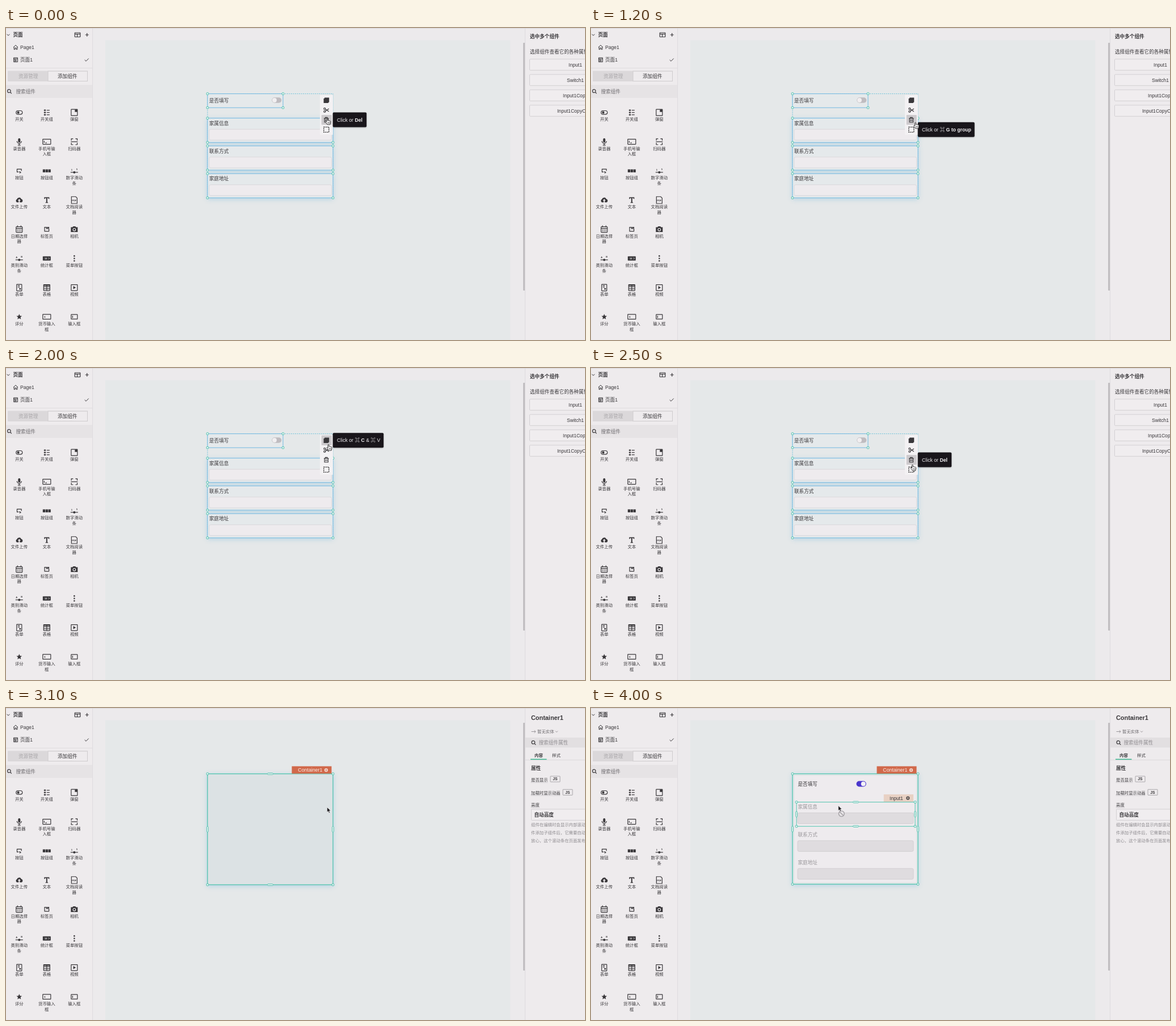
Animation of 1020 by 549 pixels, one loop 4100 ms. Source, as an HTML page:

```html
<!DOCTYPE html>
<html lang="zh-CN">
<head>
<meta charset="utf-8">
<title>组件编辑器</title>
<style>
  html, body { margin: 0; width: 100%; height: 100%; overflow: hidden; background: #eeebed; }
  svg { display: block; width: 1020px; height: 549px; }
  text { font-family: "Liberation Sans", "Noto Sans CJK SC", "Noto Sans CJK", "DejaVu Sans", sans-serif; white-space: pre; }
  .icon { fill: none; stroke: #39373a; stroke-width: 1.2; }
  .icon .solid, .solid { fill: #39373a; stroke: none; }
  .glow { filter: drop-shadow(0 2px 4px #b4d3e3); }
  .tip { filter: drop-shadow(0 1px 1px #0003); }
</style>
</head>
<body>
<svg id="stage" viewBox="0 0 1020 549"></svg>
<script>
const INK = '#39373a', GRAY = '#8f8c90', BLUE = '#72b9e2', TEAL = '#50c4ae';

const rect = (x, y, w, h, fill, stroke = 'none', r = 0, extra = '') =>
  `<rect x="${x}" y="${y}" width="${w}" height="${h}" rx="${r}" fill="${fill}" stroke="${stroke}" ${extra}/>`;
const text = (x, cy, str, { size = 8.6, fill = INK, bold = false, anchor = 'start' } = {}) =>
  `<text x="${x}" y="${cy + size * 0.36}" font-size="${size}" fill="${fill}" text-anchor="${anchor}"${bold ? ' font-weight="700"' : ''}>${str}</text>`;
const path = (d, extra = '') => `<path d="${d}" ${extra}/>`;
const solid = d => path(d, 'class="solid"');
const icon = (x, y, body) => `<g class="icon" transform="translate(${x} ${y})">${body}</g>`;
const group = (id, body) => `<g id="${id}">${body}</g>`;
const tiny = (x, y, str, fill = INK) =>
  `<g stroke="none">${text(x, y, str, { size: 4, fill, bold: true, anchor: 'middle' })}</g>`;
const frame = (w, h, r = 0.5) => rect(-w / 2, -h / 2, w, h, 'none', INK, r);
const magnifier = (x, y) => icon(x, y, '<circle cx="-.6" cy="-.6" r="2.8"/>' + path('M1.5 1.5L3.8 3.8'));
const gear = (x, y, color) =>
  `<g fill="none" stroke="${color}"><circle cx="${x}" cy="${y}" r="2.4" stroke-width="1.3"/><circle cx="${x}" cy="${y}" r=".5"/></g>`;

function handles(x, y, w, h, mids = false) {
  let out = '';
  for (const px of [x, x + w]) for (const py of [y, y + h])
    out += rect(px - 1.8, py - 1.8, 3.6, 3.6, '#f1f3f4', TEAL, 0.8);
  if (mids) {
    for (const py of [y, y + h]) out += rect(x + w / 2 - 5, py - 1.3, 10, 2.6, '#f1f3f4', TEAL, 1.2);
    for (const px of [x, x + w]) out += rect(px - 1.3, y + h / 2 - 5, 2.6, 10, '#f1f3f4', TEAL, 1.2);
  }
  return out;
}

const slider = (a, b) => path('M-6.5 2.5H6.5') + '<circle class="solid" cx="0" cy="2.5" r="2"/>' +
  tiny(-4.5, -2, a) + tiny(4.5, -3, b);

// Palette entries: label and icon, three per row.
const palette = [
  ['开关', rect(-5.5, -3.2, 11, 6.4, 'none', INK, 3.2) + '<circle class="solid" cx="-1.8" cy="0" r="2.1"/>'],
  ['开关组', [-4, 0, 4].map(y => rect(-4.8, y - 1, 3, 2, INK, INK, 1, 'stroke-width=".6"') + path(`M0 ${y}H5`)).join('')],
  ['弹窗', frame(11, 11) + solid('M1 -5.5H5.5V-1H1z')],
  ['录音器', rect(-2, -6, 4, 7.5, INK, 'none', 2) + path('M-4 -1a4 4 0 0 0 8 0M0 3V6M-2.5 6H2.5')],
  ['手机号输<br>入框', frame(14, 9) + path('M-4.5 -1.5V2M-2.5 2H0')],
  ['扫码器', path('M-5.2 -2V-5.2H-2M2 -5.2H5.2V-2M5.2 2V5.2H2M-2 5.2H-5.2V2M-6 0H6')],
  ['按钮', path('M-1 2H-3.8V-3H3.8V0') + solid('M0 0L4 3L2 3.4L1 5z')],
  ['按钮组', solid('M-7 -2.7H-2.7V2.7H-7zM-2.1 -2.7H2.1V2.7H-2.1zM2.7 -2.7H7V2.7H2.7z')],
  ['数字滑动条', slider('1', '5')],
  ['文件上传', solid('M-4 4A3 3 0 0 1 -4 -1.5A4 4 0 0 1 3.5 -2A3.1 3.1 0 0 1 4 4H1V1H2.6L0 -2L-2.6 1H-1V4z')],
  ['文本', solid('M-4.5 -5H4.5V-2H3.2L2.8 -3.5H1V3.5L2.3 4.2V5H-2.3V4.2L-1 3.5V-3.5H-2.8L-3.2 -2H-4.5z')],
  ['文档阅读器', path('M-5 -6H2.5L5 -3.5V6H-5z') + tiny(0, 0.5, 'PDF')],
  ['日期选择器', rect(-5.5, -4.5, 11, 10, 'none', INK, 1) + path('M-5.5 -1.5H5.5M-3 -6.5V-3.5M3 -6.5V-3.5') + path('M-3.5 1H4M-3.5 3.3H4', 'stroke-dasharray="1.4 1.5"')],
  ['标签页', path('M-3.8 -3.5H-.5V-1H3.8V3.5H-3.8z') + solid('M.5 -4H4.3V-2H.5z')],
  ['相机', solid('M-6 -3.5H-3L-2 -5.2H2L3 -3.5H6V5H-6z') + '<circle cx="0" cy=".7" r="2.3" stroke="#eeebed"/>'],
  ['类别滑动条', slider('A', 'B')],
  ['统计框', rect(-7, -3.8, 14, 7.6, INK, 'none', 0.8) + tiny(-1.5, 0, '12', '#fff') + path('M3 -1.5L4.7 0L3 1.5', 'stroke="#fff" stroke-width=".7"')],
  ['菜单按钮', [-4.3, 0, 4.3].map(y => `<circle class="solid" cx="0" cy="${y}" r="1.3"/>`).join('')],
  ['表单', frame(9, 11.5) + path('M-2.5 -3.5H1M-2.5 -1H1') + solid('M0 1H3V3.5H0z')],
  ['表格', frame(11, 10.5) + path('M-5.5 -1.5H5.5M-5.5 2H5.5M0 -4V5') + solid('M-5.5 -5.5H5.5V-3.2H-5.5z')],
  ['视频', frame(11, 10.5) + solid('M-1.8 -2.8L2.8 0L-1.8 2.8z')],
  ['评分', solid('M0 -5L1.4 -1.6L4.8 -1.3L2.2 .9L3 4.3L0 2.5L-3 4.3L-2.2 .9L-4.8 -1.3L-1.4 -1.6z')],
  ['货币输入框', frame(14, 8.6) + tiny(-3.5, 0, '$')],
  ['输入框', frame(11, 8) + path('M-3 -2V2')],
];

function paletteItem([label, body], i) {
  const x = 23.3 + 48.5 * (i % 3), y = 148.7 + 51.35 * Math.floor(i / 3);
  const chars = label.replace('<br>', '');
  const line = (str, dy) => text(x, y + dy, str, { size: 7.4, anchor: 'middle' });
  return icon(x, y, body) + line(chars.slice(0, 4), 12) + line(chars.slice(4), 21.7);
}

const sidebar = rect(0, 0, 152, 549, '#eeebed') +
  path('M152.5 0V549', 'stroke="#dfdcdf"') +
  icon(4, 12, path('M-2.5 -1.2L0 1.3L2.5 -1.2', 'stroke-width="1"')) + text(12.5, 12, '页面', { bold: true }) +
  icon(126, 12, frame(9.5, 7.5) + path('M-4.7 -1.3H4.7M-.5 -1.3V3.7')) +
  icon(142.7, 12, path('M-3 0H3M0 -3V3')) +
  icon(17, 34, path('M-4 0L0 -3.8L4 0M-2.9 -.8V3.7H-1V1H1V3.7H2.9V-.8', 'stroke-width="1"')) + text(25, 34, 'Page1') +
  icon(17, 56, path('M-3.5 -3.7H3.5V3.7H-3.5zM-3.5 -1.8H3.5M-1.8 .2H2M-1.8 2H2M-1.6 -1.8V3.7', 'stroke-width="1"')) + text(25, 56, '页面1') +
  icon(142, 56, path('M-3.4 0L-1 2.4L3.6 -2.4', 'stroke-width="1"')) +
  path('M0 70.5H152', 'stroke="#dfdcdf"') +
  rect(3, 75.5, 141, 18.5, '#dbd8da') + rect(74, 76, 69.5, 17.5, '#eeebed', '#cfccce') +
  text(22, 85, '资源管理', { fill: '#aaa7aa' }) + text(91, 85, '添加组件') +
  rect(0, 100, 152, 23, '#e6e3e5') + magnifier(6, 111.5) + text(17.5, 111.5, '搜索组件', { fill: '#6d6a6e' }) +
  palette.map(paletteItem).join('');

const backdrop = rect(0, 0, 1020, 549, '#eceaec') + rect(175, 21.5, 713.5, 528, '#e5e8e9') +
  rect(911, 26, 3.4, 436, '#c1bec1', 'none', 1) + rect(915, 0, 105, 549, '#eeebed') +
  path('M914.5 0V549', 'stroke="#dedbde"');

const multiPanel = text(923, 14.5, '选中多个组件', { bold: true }) + text(923, 41.5, '选择组件查看它的各种属性') +
  ['Input1', 'Switch1', 'Input1Copy', 'Input1CopyCopy'].map((name, i) =>
    rect(922.5, 54.8 + 27 * i, 160, 19.5, '#f0edef', '#d3d0d3', 1) +
    text(1003, 64.6 + 27 * i, name, { anchor: 'middle' })).join('');

const jsBadge = (x, y) => rect(x, y - 5, 17, 10, '#eeebed', '#99969a', 0.5, 'stroke-width=".8"') +
  text(x + 8.5, y, 'JS', { size: 6.8, bold: true, anchor: 'middle' });
const property = (y, name) => text(925, y, name, { size: 7.4 }) +
  path(`M925 ${y + 5}h${name.length * 7.4}`, 'stroke="#8f8c90" stroke-width=".7" stroke-dasharray="1 1"');
const containerPanel = text(925, 17, 'Container1', { size: 10.9, bold: true }) +
  path('M925.5 41.5H933M930.7 39.2L933 41.5L930.7 43.8M968 40.5L970 42.5L972 40.5', `fill="none" stroke="${GRAY}" stroke-width=".9"`) +
  text(936, 41.5, '暂无实体', { size: 7.4, fill: '#6d6a6e' }) +
  rect(915, 52, 105, 17.5, '#e2dfe1') + magnifier(929.5, 61) + text(938.5, 61, '搜索组件属性', { fill: GRAY }) +
  text(931, 83, '内容', { size: 7.4, bold: true }) + text(962, 83, '样式', { size: 7.4 }) +
  path('M915 91.5H1020', 'stroke="#dcd9dc"') + rect(924, 89.5, 28.5, 1.6, '#47b995') +
  text(925, 105.5, '属性', { bold: true }) +
  property(126, '是否显示') + jsBadge(959, 125) + property(149, '加载时显示动画') + jsBadge(981, 148.3) +
  property(170, '高度') +
  rect(925.5, 178, 120, 19.5, '#f0edef', '#d3d0d3', 1) + text(930.5, 187.7, '自动高度', { bold: true }) +
  ['组件在编辑时会显示内部滚动条', '件添加子组件后，它需要自动调', '放心，这个滚动条在页面发布后'].map((line, i) =>
    text(925, 205.8 + 13.7 * i, line, { size: 7.4, fill: GRAY })).join('');

const fields = ['家属信息', '联系方式', '家庭地址'];
const outlined = (y, w, h) => rect(355, y, w, h, '#e5e9eb', BLUE, 0, 'class="glow"');
const selection =
  rect(355, 115.7, 221, 183, 'none', '#62bfd8', 0, 'stroke-dasharray="2 1.5" stroke-width=".9"') +
  rect(355, 115.7, 133, 24.5, '#e5e9eb', BLUE) + handles(355, 115.7, 133, 24.5) +
  text(358, 127.8, '是否填写') +
  rect(468.3, 122.3, 17, 9.4, '#bfbcc0', 'none', 4.7) + '<circle cx="473" cy="127" r="3.9" fill="#f1eff1"/>' +
  fields.map((name, i) => {
    const y = 158.7 + 48.8 * i;
    return outlined(y, 221, 42.6) + text(358, y + 9, name) +
      rect(358, y + 19.5, 215.5, 19, '#eeebee', '#d6d5d9', 2.5, 'stroke-width=".8"') + handles(355, y, 221, 42.6);
  }).join('');

const toolY = [127.3, 144.5, 161.6, 178.8];
const toolIcons = [
  solid('M-3.2 -4.7H4.9V3.4H3.5V4.8H-4.7V-3.2H-3.2z'),
  path('M-1.8 -1.8L4.5 2.6M-1.8 1.8L4.5 -2.6') + '<circle cx="-3" cy="-2.5" r="1.5"/><circle cx="-3" cy="2.5" r="1.5"/>',
  path('M-4.3 -2.5H4.3M-1.8 -2.7V-4.2H1.8V-2.7M-3.2 -2.5V4.2H3.2V-2.5M-1.2 -.5V2.5M1.2 -.5V2.5', 'stroke-width="1.1"'),
  rect(-4.5, -4.5, 9, 9, 'none', '#222', 0, 'stroke-dasharray="2 1.2" stroke-width="1.3"'),
];
const toolbar = rect(553, 118, 23, 70, '#f3f1f3', 'none', 1) +
  rect(555.7, 0, 18, 17.2, '#cdcacd', 'none', 1, 'id="hover"') +
  toolIcons.map((body, i) => icon(564.3, toolY[i], body)).join('');

const strong = str => `<tspan font-weight="700">${str}</tspan>`;
const tips = [
  [89.5, `${strong('⌘ C')} &amp; ⌘ V`],
  [89.5, `${strong('⌘ X')} &amp; ⌘ V`],
  [59.5, strong('Del')],
  [100, strong('⌘ G to group')],
].map(([w, keys], i) => `<g id="tip${i}" class="tip">` +
  rect(575.7, toolY[i] - 13, w, 26, '#19161b', 'none', 2) +
  text(583, toolY[i], `Click or ${keys}`, { size: 8.7, fill: '#efedf0' }) + '</g>').join('');

const containerTag = rect(503.5, 102.5, 70, 13, '#d1694b') +
  text(514.3, 109, 'Container1', { size: 8.8, fill: '#fbeee9' }) + gear(564, 109.2, '#fbeee9');
const emptyContainer = rect(355, 115.8, 221, 195.2, '#dce2e4', TEAL, 0, 'class="glow" stroke-width="1.3"') +
  handles(355, 115.8, 221, 195.2, true);
const filledContainer = rect(355, 115.8, 221, 194.2, '#e3eaea', TEAL, 0, 'class="glow" stroke-width="1.3"') +
  rect(357.5, 118.3, 216, 189, '#eeebee', '#d9dddf', 0, 'stroke-width=".8"') + handles(355, 115.8, 221, 194.2) +
  [355, 576].map(x => rect(x - 1.3, 208, 2.6, 10, '#f1f3f4', TEAL, 1.2)).join('') +
  text(364.5, 134, '是否填写') +
  rect(467.5, 128.5, 17.3, 10, '#4a36cc', 'none', 5) + '<circle cx="479.7" cy="133.5" r="4" fill="#f4f2f6"/>' +
  fields.map((name, i) => text(364.5, 174 + 48.9 * i, name, { fill: '#9a979b' }) +
    rect(364, 184.5 + 48.9 * i, 204, 19, '#dfdcdf', '#cecbcf', 2.5, 'stroke-width=".8"')).join('');
const inputHover = rect(515.7, 152, 52.3, 13, '#e8d1c4') + text(526, 158.6, 'Input1') + gear(558.3, 158.6, INK) +
  rect(362, 165.6, 209, 42.6, 'none', TEAL) + handles(362, 165.6, 209, 42.6, true);

// Both pointers have their hotspot at the origin.
const hand = path('M-.9 .8C-.9 -.5 1 -.5 1 .8V3.5C1.5 2.9 2.7 3 2.9 3.7C3.5 3.2 4.6 3.5 4.7 4.2C5.5 3.9 6.3 4.4 6.2 5.4C6.2 7.5 5.6 8.3 5.2 10.3H.2C-.4 8.7 -1.8 7.5 -2.8 6.1C-3.3 5.2 -2 4.4 -1.3 5.2L-.9 5.7z',
  'fill="#f6f4f6" stroke="#222" stroke-width=".9"') + path('M1.2 6V8.6M2.8 6V8.6M4.3 6V8.6', 'stroke="#222" stroke-width=".6"');
const arrow = path('M0 0V8.6L2 6.9L3.3 10L4.9 9.3L3.6 6.3L6.2 6.1z', 'fill="#1c1a1d" stroke="#f4f2f4" stroke-width=".6"') +
  group('blocked', '<circle cx="5.6" cy="14" r="4.9" fill="#e6e3e6" stroke="#a3a0a4" stroke-width="1.4"/>' +
    path('M2.3 10.7L8.9 17.3', 'stroke="#a3a0a4" stroke-width="1.4"'));

const stage = document.getElementById('stage');
stage.innerHTML = backdrop + sidebar +
  group('editing', multiPanel + selection + toolbar + tips) +
  group('grouped', containerPanel + group('empty', emptyContainer) + group('filled', filledContainer) +
    containerTag + group('inputHover', inputHover)) +
  group('hand', hand) + group('arrow', arrow) + path('M0 .5H1020', 'stroke="#d9d6d9"');

const el = id => document.getElementById(id);
const show = (id, on) => el(id).setAttribute('visibility', on ? 'inherit' : 'hidden');

// Pointer stops: tick (100 ms), x, y. Straight moves between stops.
const stops = [
  [0, 565.7, 159.5], [1, 566.3, 160.2], [2, 566.3, 160.2], [3, 566.5, 163], [5, 566.5, 174], [7, 567, 176],
  [11, 567, 176], [12, 571.5, 166.5], [13, 572, 155], [15, 571.3, 141], [17, 568.5, 142],
  [18, 568.5, 138], [20, 568, 134.8], [22, 568, 134.8], [23, 568, 142], [25, 566.3, 170.5], [27, 565.7, 175],
  [31, 565.7, 174.7], [32, 567, 176], [34, 592, 192], [36, 626, 209], [37, 600, 203], [38, 540, 190], [40, 435.7, 172],
];
// Latest entry at or before the tick wins; -1 means none.
const hoverSteps = [[0, 2], [5, 3], [12, 2], [15, -1], [16, 1], [18, 0], [23, 1], [24, 2], [26, 3]];
const tipSteps = [[0, 2], [5, -1], [6, 3], [13, 2], [14, -1], [16, 1], [19, -1], [20, 0], [24, -1], [25, 2], [26, -1], [27, 3]];
const at = (steps, tick) => steps.findLast(([start]) => start <= tick)[1];

function pointer(tick) {
  const next = stops.findIndex(([start]) => start > tick);
  if (next < 0) return stops.at(-1).slice(1);
  const [t0, x0, y0] = stops[next - 1], [t1, x1, y1] = stops[next];
  const k = (tick - t0) / (t1 - t0);
  return [x0 + (x1 - x0) * k, y0 + (y1 - y0) * k];
}

function render() {
  const tick = Math.floor(performance.now() % 4100 / 100);
  const [x, y] = pointer(tick);
  const grouped = tick >= 31, filled = tick >= 32;
  const overInput = filled && x < 571;
  const hover = at(hoverSteps, tick), tip = at(tipSteps, tick);
  show('editing', !grouped);
  show('grouped', grouped);
  show('empty', !filled);
  show('filled', filled);
  show('inputHover', overInput);
  show('blocked', overInput);
  show('hover', hover >= 0);
  if (hover >= 0) el('hover').setAttribute('y', toolY[hover] - 8.6);
  for (let i = 0; i < 4; i++) show('tip' + i, i === tip);
  for (const id of ['hand', 'arrow']) {
    show(id, (id === 'arrow') === grouped);
    el(id).setAttribute('transform', `translate(${x} ${y})`);
  }
  // Children marked "inherit" follow their hidden parent group.
  requestAnimationFrame(render);
}
render();
</script>
</body>
</html>
```
